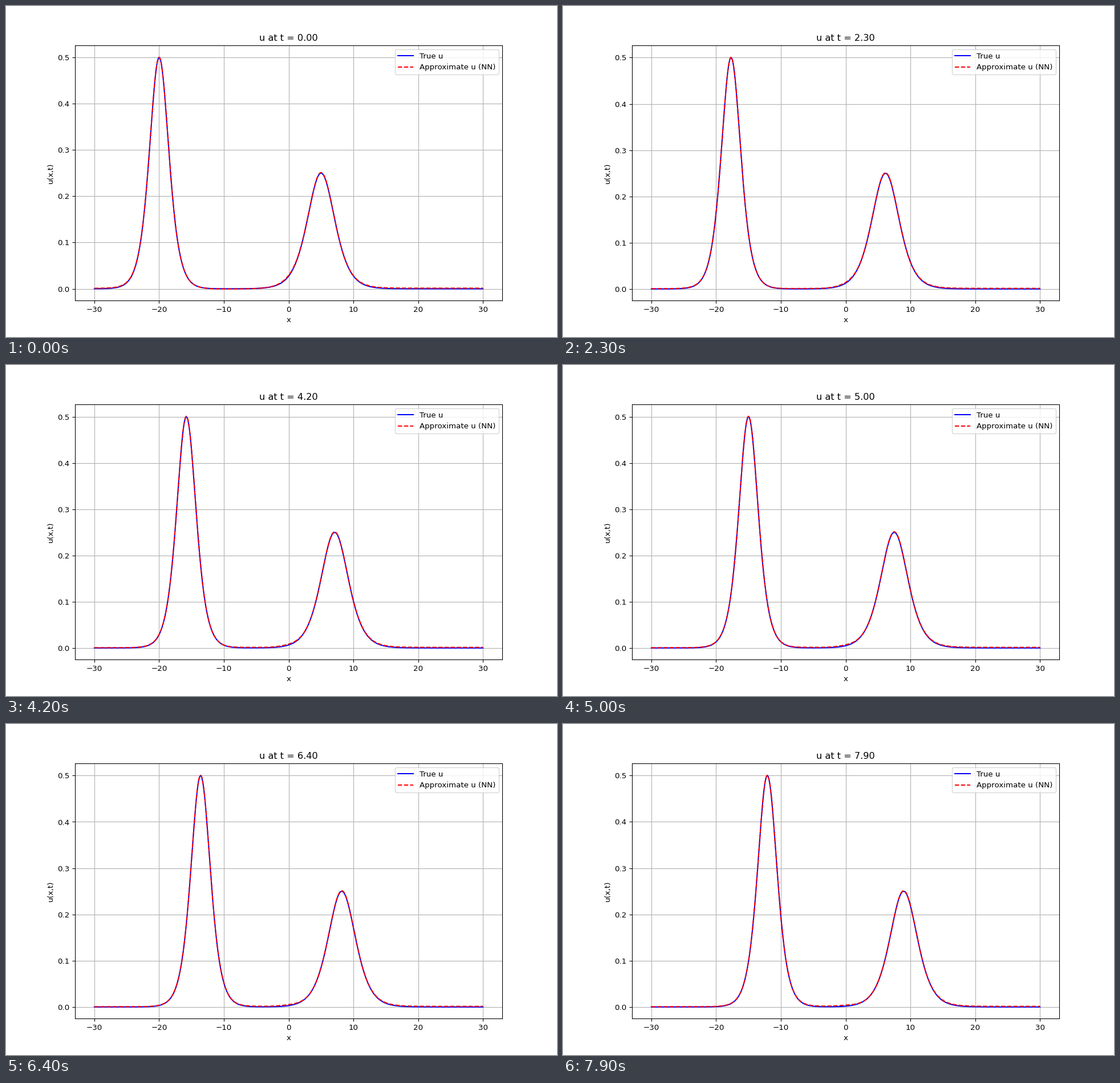
Write a matplotlib script that moves like this. It is 966 px wide and 580 px high and loops after 8 s.

```python
import numpy as np
import matplotlib.pyplot as plt
from matplotlib.animation import FuncAnimation

DPI = 96.7
W, H = 966.01, 580.01  # the hair of extra size keeps pixels from rounding down
FRAMES, INTERVAL = 80, 100

x = np.linspace(-30, 30, 500)


def soliton(c, x0, t):
    """KdV soliton of speed c, starting at x0."""
    return c / 2 / np.cosh(np.sqrt(c) / 2 * (x - c * t - x0)) ** 2


def step(center, width):
    return 0.5 * (1 + np.tanh((x - center) / width))


def bump(center, width):
    return np.exp(-((x - center) / width) ** 2)


def residual(t):
    """Small smooth error of the network."""
    settle = 1 - np.exp(-t / 1.5)
    left = (0.0011 - 0.0005 * settle) * (1 - step(-20 + t, 3))
    right = 0.0014 * step(9 + t / 2, 3)
    valley = 0.0013 * settle * bump(-8 + 0.5 * t, 4) + 0.0018 * bump(0, 2.2)
    valley -= 0.0005 * np.exp(-2 * t) * bump(-10, 3)
    peaks = 0.001 * np.sin(np.pi * t / 9) * bump(t - 20, 1.5)
    peaks += 0.0012 * bump(5 + t / 2, 2)
    return left + right + valley + peaks


# Default margins of a 10 x 6 inch page, which is a touch larger than the stage.
fig, ax = plt.subplots(figsize=(W / DPI, H / DPI), dpi=DPI)
sx, sy = 10 * DPI / W, 6 * DPI / H
fig.subplots_adjust(left=0.125 * sx, right=0.9 * sx,
                    bottom=0.11 * sy, top=0.88 * sy)

true_line, = ax.plot(x, 0 * x, "b-", label="True u")
net_line, = ax.plot(x, 0 * x, "r--", label="Approximate u (NN)")
ax.set_xlabel("x")
ax.set_ylabel("u(x,t)")
ax.legend(loc="upper right")
ax.grid(True)


def update(i):
    t = i * INTERVAL / 1000
    u = soliton(1, -20, t) + soliton(0.5, 5, t)
    true_line.set_ydata(u)
    net_line.set_ydata(u + residual(t))
    ax.relim()
    ax.autoscale_view()
    ax.set_title(f"u at t = {t:.2f}")
    return true_line, net_line


anim = FuncAnimation(fig, update, frames=FRAMES, interval=INTERVAL,
                     repeat=True, repeat_delay=0, blit=False)
plt.show()
```
